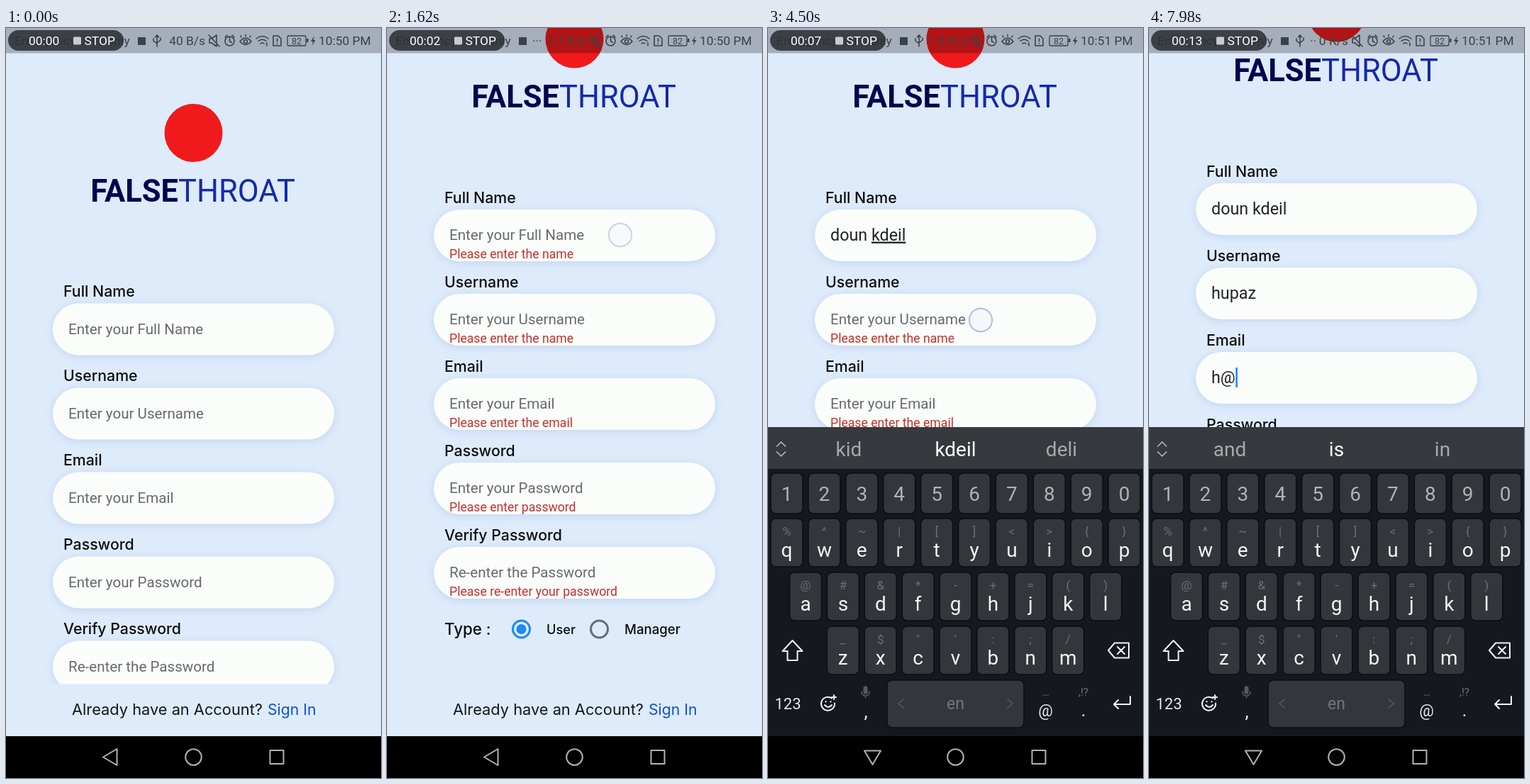
An HTML page for the animation above (8 s loop, 529 by 1058 pixels).

```html
<!DOCTYPE html>
<html lang="en">
<head>
<meta charset="utf-8">
<title>Sign up form</title>
<style>
  html, body { margin: 0; width: 100%; height: 100%; overflow: hidden; background: #deebfb; }
  svg { display: block; width: 100vw; height: 100vh; }
  text { font-family: Roboto, "Noto Sans", sans-serif; white-space: pre; }
  .ui { font-family: Inter, "Open Sans", sans-serif; }
  .mid { text-anchor: middle; }
  .end { text-anchor: end; }
  .card { filter: drop-shadow(0 2px 6px rgba(120, 155, 215, .28)); }
  .line { fill: none; stroke-linecap: round; stroke-linejoin: round; }
</style>
</head>
<body>
<svg viewBox="0 0 529 1058" xmlns="http://www.w3.org/2000/svg">
  <defs>
    <clipPath id="view"><rect width="529" height="925.5"/></clipPath>
  </defs>
  <rect width="529" height="1058" fill="#deebfb"/>

  <g clip-path="url(#view)">
    <g id="page">
      <circle cx="264.5" cy="148" r="41" fill="#f01a1c"/>
      <text class="mid" x="263.5" y="244.5" font-size="43.5" font-weight="700" fill="#02044e">FALSE<tspan font-weight="400" fill="#1529ab">THROAT</tspan></text>
      <g id="form"></g>
      <g font-weight="500" fill="#0b0d12">
        <text class="ui" x="81" y="988.5" font-size="22.3">Type :</text>
        <text class="ui" x="225" y="987" font-size="18.2">User</text>
        <text class="ui" x="335" y="987" font-size="18.6">Manager</text>
      </g>
      <g fill="none" stroke-width="3">
        <circle cx="189.5" cy="980.5" r="12" stroke="#2089ef"/>
        <circle cx="189.5" cy="980.5" r="7" fill="#2089ef" stroke="none"/>
        <circle cx="299.5" cy="980.5" r="12" stroke="#686c79"/>
      </g>
      <rect class="card" x="66" y="1068" width="397" height="73" rx="36.5" fill="#02044e"/>
      <text class="ui mid" x="264" y="1114" font-size="25" font-weight="600" fill="#fff">Sign Up</text>
    </g>
  </g>
  <text class="ui" x="93" y="969" font-size="21.8" fill="#14161c">Already have an Account?</text>
  <text class="ui" x="369" y="969" font-size="21.2" fill="#0f4fd0">Sign In</text>

  <g id="board">
    <rect y="563" width="529" height="437" fill="#15191f"/>
    <rect y="563" width="529" height="59" fill="#363a3e"/>
    <path class="line" d="M12.5 590l6-6 6 6M12.5 598l6 6 6-6" stroke="#b4b7ba" stroke-width="1.7"/>
    <g id="keys"></g>
    <g id="words"></g>
    <rect x="168" y="920" width="193" height="67" rx="7" fill="#33373b" stroke="#0b0e11" stroke-width="1.5"/>
    <g class="line" stroke="#f1f2f3" stroke-width="2">
      <path d="M34.5 864l-14 15h7v13h14v-13h7z"/>
      <path d="M480 878l9-10.5h20v21h-20zM493 873l10 10M503 873l-10 10"/>
      <path d="M511 943v11h-23M494 948l-6 6 6 6"/>
      <path d="M90 945.5a9.5 9.5 0 1 0 4 7M80 955q5 6 10 0M81.5 950v.5M88.5 950v.5M93 941v6M90 944h6"/>
    </g>
    <g class="line" stroke="#565a5e" stroke-width="1.6">
      <path d="M191 947l-7 6 7 6M338 947l7 6-7 6"/>
      <path d="M132 936q0 6 5.5 6t5.5-6M137.5 942v3"/>
      <rect x="135.3" y="929" width="4.4" height="10" rx="2.2" fill="#565a5e"/>
    </g>
    <g class="mid">
      <text x="28" y="961" font-size="22" fill="#e4e6e8">123</text>
      <text x="138" y="973" font-size="26" fill="#eee">,</text>
      <text x="264.5" y="961" font-size="23" fill="#72767a">en</text>
      <text x="391.5" y="971" font-size="23" fill="#e4e6e8">@</text>
      <text x="445" y="971" font-size="25" fill="#eee">.</text>
      <text x="392" y="942" font-size="14" fill="#72767a">…</text>
      <text x="445" y="942" font-size="15" fill="#72767a">,!?</text>
    </g>
  </g>

  <rect y="999" width="529" height="59"/>
  <g class="line" stroke="#b2b2b2" stroke-width="2">
    <path id="back"/>
    <circle cx="264.5" cy="1028.5" r="11.3"/>
    <rect x="372.5" y="1019" width="19" height="19"/>
  </g>

  <rect width="529" height="35.5" fill="rgba(0,0,0,.26)"/>
  <g fill="#3c4148" font-size="17.4">
    <text x="12" y="24">Emergency calls only</text>
    <rect x="186" y="13" width="11" height="11"/>
    <text id="rate" class="end" x="281" y="24"></text>
    <text id="dots" y="24"></text>
    <text x="441" y="24" id="clock"></text>
    <text class="mid" x="410" y="22.5" font-size="12.5">82</text>
    <path d="M435 11l-5 8h3l-1.5 6 5-8h-3z"/>
    <rect x="424" y="15" width="2.5" height="5"/>
  </g>
  <g class="line" stroke="#3c4148" stroke-width="1.6">
    <path id="usb" d="M213 10v16M210.5 13l2.5-3 2.5 3M208 15v3l5 4M218 14v3l-5 4"/>
    <path d="M287 15v6h3l7 5v-16l-7 5zM286 10l15 16"/>
    <path d="M315.5 13v5.5l3 2M309 13l3-3M322 13l-3-3"/><circle cx="315.5" cy="18.5" r="6.5"/>
    <path d="M330 19q8-10 16 0-8 9-16 0zM332 13l-1-2M338 11.5v-2M344 13l1-2"/><circle cx="338" cy="19" r="2.5"/>
    <path d="M353 15q8.5-7 17 0M356 18.5q5.5-4.5 11 0M359 22q2.5-2 5 0M368 21v4"/>
    <path d="M377 11h7l4 4v10h-11zM382.5 15v4M382.5 22v.2"/>
    <rect x="397" y="11" width="26" height="14" rx="2" stroke-width="1.3"/>
  </g>
  <rect x="3" y="3" width="163" height="29" rx="14.5" fill="rgba(43,47,53,.86)"/>
  <circle id="rec" cx="20.5" cy="18" r="6.5" fill="#fb4a23"/>
  <rect x="95" y="12.5" width="11" height="11" rx="1.5" fill="#c9cbce"/>
  <g fill="#fff" font-size="17.4">
    <text id="timer" x="32" y="24"></text>
    <text x="110.5" y="24">STOP</text>
  </g>
  <circle id="finger" r="16.2" fill="rgba(243,246,248,.74)" stroke="rgba(150,168,222,.75)" stroke-width="2"/>
</svg>

<script>
const LOOP = 8000, STEP = 60;
const $ = id => document.getElementById(id);

function add(parent, tag, attrs, content = '') {
  const el = document.createElementNS('http://www.w3.org/2000/svg', tag);
  for (const k in attrs) el.setAttribute(k, attrs[k]);
  el.textContent = content;
  return parent.appendChild(el);
}
const show = (el, on) => el.setAttribute('visibility', on ? 'visible' : 'hidden');
const pad = n => String(n).padStart(2, '0');

// Form fields
const fields = [
  ['Full Name', 'Enter your Full Name', 'Please enter the name'],
  ['Username', 'Enter your Username', 'Please enter the name'],
  ['Email', 'Enter your Email', 'Please enter the email'],
  ['Password', 'Enter your Password', 'Please enter password'],
  ['Verify Password', 'Re-enter the Password', 'Please re-enter your password'],
].map(([label, hint, error], i) => {
  const g = add($('form'), 'g', { transform: `translate(0 ${388.5 + 119 * i})` });
  add(g, 'text', { class: 'ui', x: 81, y: -9.5, 'font-size': 21.3, 'font-weight': 500, fill: '#0b0d12' }, label);
  add(g, 'rect', { class: 'card', x: 66, y: 0, width: 397, height: 73, rx: 36.5, fill: '#fbfdfa' });
  const value = add(g, 'text', { x: 88, y: 43.5, 'font-size': 23.3, fill: '#202226' });
  return {
    error, value,
    done: add(value, 'tspan', {}),
    word: add(value, 'tspan', { 'text-decoration': 'underline' }),
    hint: add(g, 'text', { x: 88, y: 43, 'font-size': 20.6, fill: '#68696d' }, hint),
    note: add(g, 'text', { x: 88, y: 69, 'font-size': 17.65, fill: '#c4312d' }),
    caret: add(g, 'rect', { y: 22, width: 2.6, height: 28 }),
  };
});

// Keyboard
const keyAt = { ' ': [264, 950], '@': [391, 955] };
[
  ['1234567890', '', 26.5, 628, 57],
  ['qwertyuiop', '%^~|[]<>{}', 26.5, 692, 68],
  ['asdfghjkl', '@#&*-+=()', 53, 768, 68],
  ['zxcvbnm', '_$"\':;/', 105.8, 844, 68],
].forEach(([row, hints, x0, y, h]) => [...row].forEach((ch, i) => {
  const x = x0 + 52.9 * i, keys = $('keys');
  keyAt[ch] = [x, y + 34];
  add(keys, 'rect', { x: x - 22.5, y, width: 45, height: h, rx: 7, fill: '#33373b', stroke: '#0b0e11', 'stroke-width': 1.5 });
  add(keys, 'text', { class: 'mid', x, y: y + (hints ? 54 : 39), 'font-size': 28, fill: hints ? '#f4f5f6' : '#b0b3b6' }, ch);
  if (hints) add(keys, 'text', { class: 'mid', x, y: y + 24, 'font-size': 17, fill: '#6c7074' }, hints[i]);
}));

const slots = [114, 264.5, 414].map((x, i) =>
  add($('words'), 'text', { class: 'mid', x, fill: i === 1 ? '#fff' : '#a6a9ac' }));

// [start, key, dx, dy] for each field
const typing = [
  [[2200, 'd'], [2380, 'o'], [2560, 'u'], [2720, 'n', 2], [3060, ' '],
   [3400, 'k'], [3580, 'd'], [3720, 'e', 10, -9], [3960, 'i'], [4140, 'l']],
  [[5320, 'h', -3], [5520, 'u'], [5700, 'p'], [6200, 'a'], [6420, 'z']],
  [[7460, 'h'], [7720, '@']],
];
// The next finger lands just after the one before has faded
typing[1][1][0] = 5540;
const focusAt = [1740, 4620, 6840];

// [down, up, from, to]
const touches = [
  [60, 600, [478, 780], [504, 444]],
  [900, 980, [300, 795], [300, 795]],
  [1120, 1400, [400, 400], [430, 585]],
  [1500, 1560, [329, 292], [329, 292]],
  [4500, 4560, [300, 412], [300, 412]],
  [6720, 6780, [300, 530], [300, 530]],
  ...typing.flat().map(([a, ch, dx = 0, dy = 4]) => {
    const p = [keyAt[ch][0] + dx, keyAt[ch][1] + dy];
    return [a, a + STEP, p, p];
  }),
].sort((a, b) => a[0] - b[0]);

const suggestions = [
  [0, 'I', 'the', 'and'], [2260, 'did', 'd', 'do'], [2440, 'dog', 'do', 'for'],
  [2620, 'you', 'dou', 'down'], [2780, 'doun@pel…com', 'doun', 'doUn@kIv4r'],
  [3120, 'is', 'and', 'the'], [3460, 'know', 'k', 'ok'], [3640, 'send', 'kdeil', 'dr'],
  [4200, 'kid', 'kdeil', 'deli'], [4620, 'I', 'the', 'and'],
  [5380, 'dourinkdeil7p@pel…com', 'h', 'doun'], [5600, 'hi', 'hu', 'hung'],
  [5760, 'hip', 'hup', 'hope'], [6260, 'his', 'hupa', 'pa'], [6480, 'has', 'hupaz', 'up'],
  [6840, 'I', 'the', 'and'], [7520, 'dourinkdeil7p@pel…com', 'h', 'doun'], [7780, 'and', 'is', 'in'],
];
const rates = [[0, '40 B/s', ''], [1380, '1.7 K/s', '···'], [3180, '0 K/s', '··'], [4980, '172 B/s', '··'], [6780, '0 K/s', '··']];

const latest = (list, t) => list.filter(e => e[0] <= t).pop();
const ease = (t, a, b) => {
  const p = Math.min(1, Math.max(0, (t - a) / (b - a)));
  return p * p * (3 - 2 * p);
};

function drawFields(t) {
  const active = focusAt.filter(f => f <= t).length - 1;
  fields.forEach((f, i) => {
    const struck = (typing[i] || []).filter(k => k[0] + STEP <= t);
    const text = struck.map(k => k[1]).join('');
    const cut = i === active && i < 2 ? text.lastIndexOf(' ') + 1 : text.length;
    f.done.textContent = text.slice(0, cut);
    f.word.textContent = text.slice(cut);
    show(f.hint, !text);

    let error = t >= 1020 && !text ? f.error : '';
    if (i === 0 && text && !/ \S/.test(text)) error = 'Please enter your full name';
    f.note.textContent = error;

    const last = struck.length ? struck[struck.length - 1][0] + STEP : focusAt[i];
    show(f.caret, i === active && (t - last) % 600 < 300);
    f.caret.setAttribute('x', 88.5 + (text ? f.value.getComputedTextLength() : 0));
    f.caret.setAttribute('fill', error ? '#e8392f' : '#2089ef');
  });
}

function drawSuggestions(t) {
  latest(suggestions, t).slice(1).forEach((word, i) => {
    const el = slots[i];
    el.textContent = word;
    el.setAttribute('font-size', 28);
    const size = Math.min(28, 28 * 90 / el.getComputedTextLength());
    el.setAttribute('font-size', size);
    el.setAttribute('y', 594 + size * .34);
  });
}

function drawStatus(t) {
  const [, rate, dots] = latest(rates, t);
  const roomy = rate.length < 7;
  $('rate').textContent = rate;
  $('dots').textContent = dots;
  $('dots').setAttribute('x', roomy ? 227 : 205);
  show($('usb'), roomy);
  $('clock').textContent = t < 4500 ? '10:50 PM' : '10:51 PM';
  const sec = Math.max(0, t - 60);
  $('timer').textContent = '00:' + pad(Math.floor(sec / 600));
  show($('rec'), sec % 600 >= 390);
}

function drawFinger(t) {
  const touch = latest(touches, t);
  show($('finger'), touch);
  if (!touch) return;
  const [a, b, from, to] = touch, p = ease(t, a, b);
  $('finger').setAttribute('cx', from[0] + (to[0] - from[0]) * p);
  $('finger').setAttribute('cy', from[1] + (to[1] - from[1]) * p);
  $('finger').setAttribute('opacity', Math.min(1, Math.max(0, 1 - (t - b) / 180)));
}

function draw(t) {
  const scroll = 311 * ease(t, 90, 560) - 178.5 * ease(t, 1140, 1460) + 37 * ease(t, 6800, 7040);
  $('page').setAttribute('transform', `translate(0 ${-scroll})`);
  $('board').setAttribute('transform', `translate(0 ${437 * (1 - ease(t, 1700, 1920))})`);
  show($('board'), t >= 1740);
  $('back').setAttribute('d', t < 1740 ? 'M137 1028.5l19.5-11.5v23z' : 'M136 1019.5h23l-11.5 19.5z');
  drawFields(t);
  drawSuggestions(t);
  drawStatus(t);
  drawFinger(t);
}

const start = performance.now();
let shown = -1;
function tick() {
  const t = Math.floor((performance.now() - start) % LOOP / STEP) * STEP;
  if (t !== shown) draw(shown = t);
  requestAnimationFrame(tick);
}
tick();
</script>
</body>
</html>
```
